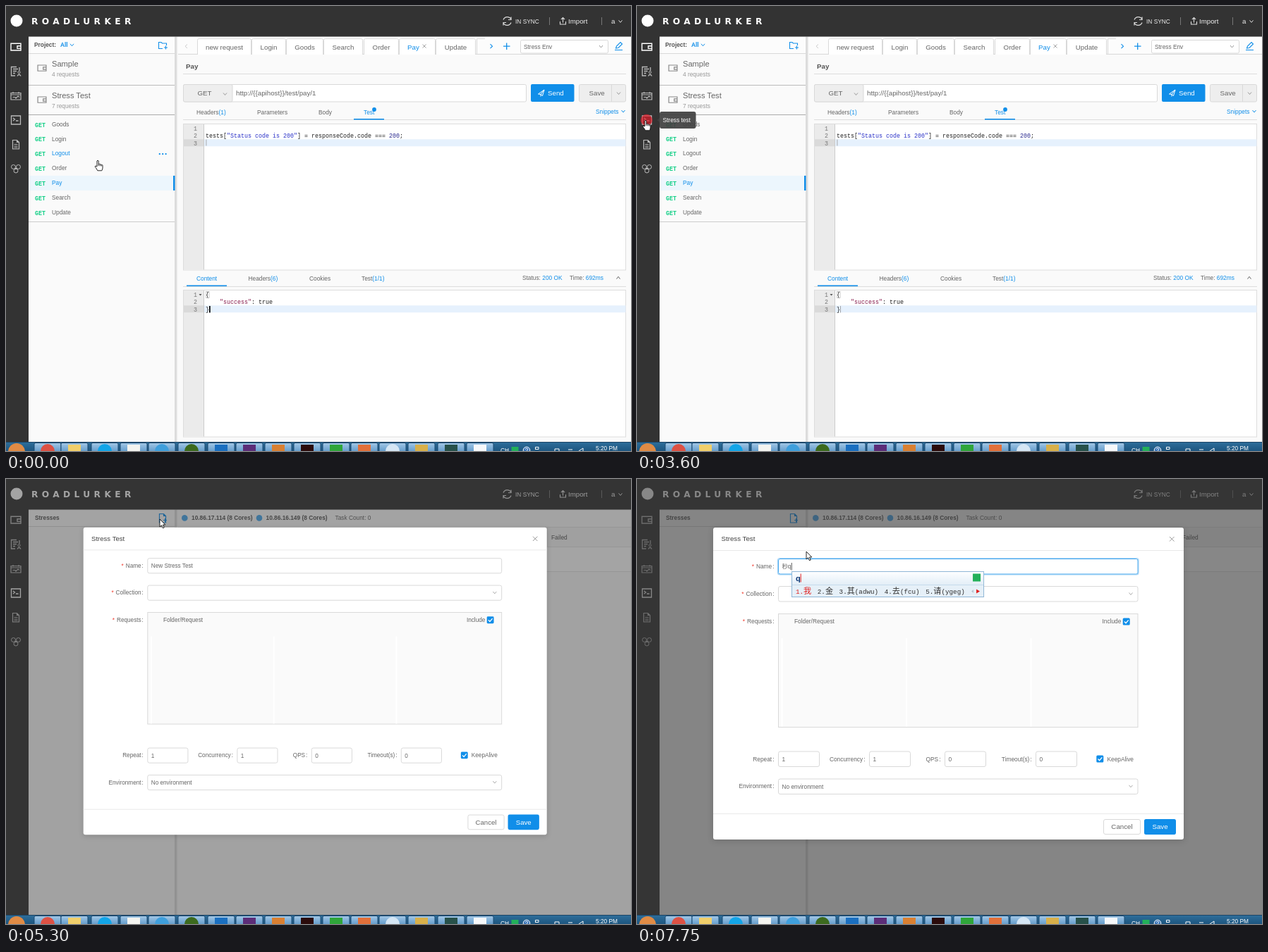
An HTML page for the animation above (8 s loop, 886 by 632 pixels).

```html
<!DOCTYPE html>
<html lang="en">
<head>
<meta charset="utf-8">
<title>Stress test walkthrough</title>
<style>
html, body { margin: 0; width: 100%; height: 100%; overflow: hidden; background: #fafafa; }
svg { display: block; width: 886px; height: 632px; }
text { white-space: pre; font-family: "Liberation Sans", Arial, "Noto Sans CJK SC", sans-serif; }
.mono { font-family: "Liberation Mono", "Noto Sans CJK SC", monospace; }
.brand { font-family: "DejaVu Sans", sans-serif; letter-spacing: 5.4px; }
</style>
</head>
<body>
<svg id="stage" viewBox="0 0 886 632"></svg>
<script>
const BLUE = '#108ee9', GREY = '#666', LINE = '#d9d9d9', LOOP = 8000;
const SMALL = 8.34, MEDIUM = 9.73, LARGE = 11.12;

// Drawing helpers, each returning SVG markup
const text = (x, y, s, fill = GREY, size = SMALL, extra = '') =>
  `<text x="${x}" y="${y}" fill="${fill}" font-size="${size}" ${extra}>${s}</text>`;
const span = (s, fill, extra = '') => `<tspan fill="${fill}" ${extra}>${s}</tspan>`;
const rect = (x, y, w, h, fill, stroke = 'none', rx = 0, extra = '') =>
  `<rect x="${x}" y="${y}" width="${w}" height="${h}" fill="${fill}" stroke="${stroke}" rx="${rx}" ${extra}/>`;
const circle = (x, y, r, fill, stroke = 'none') =>
  `<circle cx="${x}" cy="${y}" r="${r}" fill="${fill}" stroke="${stroke}"/>`;
const path = (d, stroke, width = 1, fill = 'none') =>
  `<path d="${d}" stroke="${stroke}" stroke-width="${width}" fill="${fill}"/>`;
const group = (id, body, extra = '') => `<g id="${id}" ${extra}>${body}</g>`;
const at = (x, y, body) => `<g transform="translate(${x} ${y})">${body}</g>`;
const hline = (x1, x2, y, color = LINE) => path(`M${x1} ${y}H${x2}`, color);
const chevron = (x, y, color, h = 1.5) => path(`M${x - 2.5} ${y - h}L${x} ${y + h}L${x + 2.5} ${y - h}`, color);
const BOLD = 'font-weight="700"', MONO = 'class="mono"', MID = 'text-anchor="middle"', END = 'text-anchor="end"';

const wallet = (color, s = 1) =>
  `<g transform="scale(${s})">${path('M-7-4.7H7V5H-7ZM7-1.3H2V2.4H7M-7-4.7H5', color, 1.4)}</g>`;
const docIcon = color =>
  path('M-4.5-6.5H1.5L4.5-3.5V6H-4.5ZM1.5-6.5V-3.5H4.5', color, 1.2);
const sheet = at(222, 56, docIcon(BLUE) + path('M1 2.5H6M3.5 0V5', BLUE, 1.1));

function header() {
  return rect(0, 0, 886, 43.5, '#333') + rect(0, 43, 32, 576, '#333') +
    circle(15, 21, 8.5, '#fff') +
    text(36, 26, 'ROADLURKER', '#fff', 12.2, BOLD + ' class="brand"') +
    path('M705 19.5A6 6 0 0 1 716 19M716 15.5V19.5H712M716 23.5A6 6 0 0 1 705 24M705 27.5V23.5H709', '#ddd', 1.2) +
    text(722, 24.6, 'IN SYNC', '#eee') +
    path('M770.5 16V27M844.5 16V27', '#777') +
    path('M785.5 22V26H793.5V22M789.5 23.5V16.5M787 19L789.5 16.5L792 19', '#ddd', 1.1) +
    text(797, 25, 'Import', '#eee', MEDIUM) +
    text(858, 25, 'a', '#eee', MEDIUM) + chevron(871, 21.8, '#ddd');
}

function sidebar() {
  const c = '#bbb';
  return at(14, 58, wallet('currentColor')).replace('<g', '<g id="navApi"') +
    at(14, 93, path('M1-6.5H-6.5V6H-1M-4-3.5H3M-4-.5H1M-4 2.5H-1M5-6V-1M2 6.5Q4.5 2 7 6.5', c, 1.3) + circle(4.5, 1.2, 1.6, 'none', c)) +
    at(14, 128, path('M-7-4.5H7V5H-7ZM-7-2H7M-4-6V-3.5M4-6V-3.5M-4.5 1.5H-1L0 3L3 0L5 1.5', c, 1.2)) +
    at(14, 162, path('M-6.5-6H6.5V6H-6.5ZM-4-3L-1.5-1L-4 1M0 1H3.5', 'currentColor', 1.3)).replace('<g', '<g id="navStress"') +
    at(14, 197, docIcon(c) + path('M-2.5-.5H2.5M-2.5 2H2.5M-2.5 4H2.5', c, .9)) +
    at(14, 231, [[-3.5, -2.5], [3.5, -2.5], [0, 3]].map(p => circle(...p, 3, 'none', c)).join('') + circle(0, 0, 1.2, c));
}

const ROWS = ['Goods', 'Login', 'Logout', 'Order', 'Pay', 'Search', 'Update'];
const rowY = i => 168 + i * 20.83;

function panel() {
  return rect(32, 43.5, 208, 575.5, '#fafafa') + rect(32, 43.5, 854, 24, '#fcfcfc') +
    rect(239, 43.5, 3.5, 575.5, '#dcdcdc') + rect(242, 43.5, 1.5, 575.5, '#f1f1f1') + hline(32, 239, 67.5);
}

function requestList() {
  const folder = (y, name, count) => at(51, y + 6, wallet('#888', .85)) +
    text(65, y + 3.5, name, GREY, LARGE) + text(65, y + 18, count + ' requests', '#999');
  const rows = ROWS.map((name, i) =>
    text(41, rowY(i) + 3.6, 'GET', '#14cf87', SMALL, BOLD + ' ' + MONO) +
    text(65, rowY(i) + 2.8, name, GREY, SMALL, 'data-row')).join('');
  return text(40, 58.3, 'Project:', '#555', SMALL, BOLD) + text(77, 58.3, 'All', BLUE, SMALL, BOLD) +
    chevron(93.5, 55.3, BLUE) +
    path('M222 60.5H216.5V51.5H220L221.5 53H227.5V56M224 59H229M226.5 56.5V61.5', BLUE, 1.1) +
    folder(82, 'Sample', 4) + hline(32, 239, 112.5, '#bbb') +
    folder(127, 'Stress Test', 7) + hline(32, 239, 154.5, '#aaa') +
    rect(32, 241, 205, 21, '#ecf6fd') + rect(237, 241, 2.5, 21, BLUE) +
    rows + hline(32, 239, 306.5, '#ccc') +
    group('dots', [217.8, 222.2, 226.6].map(x => circle(x, 0, 1.15, 'currentColor')).join(''));
}

function editor(y, h, active, lines) {
  const top = y + 1.5 + active * 10.4;
  const nums = lines.map((s, i) => text(271, y + 10 + i * 10.3, i + 1, '#777', SMALL, END + ' ' + MONO));
  const code = lines.map((s, i) => text(283, y + 10 + i * 10.3, s, '#222', SMALL, MONO));
  return rect(251.5, y + .5, 627, h, '#fff', '#ddd') + rect(252, y + 1, 29, h - 1, '#ebebeb') +
    rect(281, top, 597.5, 10, '#e6f1fd') + rect(252, top, 29, 10, '#dadada') +
    path(`M280.5 ${y + 1}V${y + h}`, '#ccc') + nums.join('') + code.join('');
}

function requestPage() {
  const tabs = [[272, 75, 'new request'], [349, 47, 'Login'], [398, 51, 'Goods'], [451, 54, 'Search'],
    [508, 48, 'Order'], [558, 50, ''], [610, 55, 'Update']].map(([x, w, s]) =>
      path(`M${x - .5} 69V48.5Q${x - .5} 46.5 ${x + 1.5} 46.5H${x + w - 1.5}Q${x + w + .5} 46.5 ${x + w + .5} 48.5V69`, LINE, 1, '#fff') +
      text(x + w / 2, 61.5, s, GREY, MEDIUM, MID)).join('');
  const count = (name, n) => name + span(`(${n})`, BLUE);
  const str = s => span(s, '#2a32c8');
  return requestList() + hline(244, 886, 68.5) + tabs +
    path('M667.5 69V46.5H679', LINE) +
    path('M257 54.5L254 57.2L257 60', '#ccc') + path('M686.5 54.2L689.5 57.2L686.5 60.2', BLUE, 1.1) +
    path('M705 57.2H714.5M709.7 52.5V62', BLUE, 1.3) +
    text(569, 61.5, 'Pay', BLUE, MEDIUM) + path('M590.5 54.5L595.5 59.5M595.5 54.5L590.5 59.5', '#999', .9) +
    rect(729.5, 48.5, 124, 18.5, '#fff', LINE, 2) + text(734, 60.5, 'Stress Env') + chevron(843.5, 57.5, '#999') +
    path('M864.5 60L865.5 57L871 51.5L873.5 54L868 59.5ZM863 62.5H874', BLUE, 1.1) +
    text(255, 89, 'Pay', '#555', MEDIUM, BOLD) + hline(251, 879, 96.5, '#ddd') +
    rect(251.5, 111.5, 486, 24.5, '#fff', LINE, 2) + rect(251.5, 111.5, 69.5, 24.5, '#eee', LINE, 2) +
    text(271.5, 127.3, 'GET', GREY, MEDIUM) + chevron(310.5, 125, '#999') +
    text(326, 127, 'http://{{apihost}}/test/pay/1', GREY, MEDIUM) +
    rect(744, 111, 61.5, 25, BLUE, 'none', 2) + path('M754.5 125L763 119L760.5 127.5L758 125.5L763 119M758 125.5V128.5M754.5 125L758 125.5', '#fff') +
    text(768, 127, 'Send', '#fff', MEDIUM) +
    rect(812.5, 111.5, 66, 24.5, '#eee', LINE, 2) + path('M858.5 112V136', LINE) +
    text(826.5, 127, 'Save', GREY, MEDIUM) + chevron(868.5, 124, '#999') +
    text(270, 153.5, count('Headers', 1)) + text(356, 153.5, 'Parameters') + text(443, 153.5, 'Body') +
    text(507, 153.5, 'Test', BLUE) + circle(522, 147, 2.9, BLUE) +
    text(836, 152.6, 'Snippets', BLUE) + chevron(875, 149.5, BLUE) +
    hline(251, 879, 161.5, '#ddd') + rect(493, 160, 43, 1.6, BLUE) +
    editor(167, 207.5, 2, ['', `tests[${str('"Status code is 200"')}] = responseCode.code === ${span('200', '#2a2a90')};`, '']) +
    rect(283.5, 189.5, .8, 9, '#999') +
    text(270, 389.7, 'Content', BLUE) + text(343.5, 389.7, count('Headers', 6)) + text(430, 389.7, 'Cookies') +
    text(504, 389.7, count('Test', '1/1')) + text(732, 389.2, 'Status: ' + span('200 OK', BLUE)) +
    text(799, 389.2, 'Time: ' + span('692ms', BLUE)) + chevron(868, 386, GREY, -1.7) +
    hline(251, 879, 398.5, '#ddd') + rect(256, 396.5, 57, 1.6, BLUE) +
    editor(403, 208.5, 2, ['{', `    ${span('"success"', '#8a1f4f')}: true`, '}']) +
    path('M273.5 409H277.5L275.5 411.5Z', 'none', 0, '#555') +
    rect(283.5, 405.5, 4.5, 9, 'none', '#bbb', 0, 'stroke-width=".7"') +
    rect(288, 426, 1.7, 9.5, '#000', 'none', 0, 'id="caret"');
}

function stressPage() {
  const heads = [[285, 'Run Date'], [445, 'Request Count'], [676, 'TPS'], [773, 'Failed']];
  return text(41, 58.3, 'Stresses', '#555', SMALL, BOLD) +
    rect(209.5, 45.5, 26, 22, '#fff', '#8fc6f2', 2, 'id="ring" opacity=".6"') + sheet +
    circle(253.3, 55.4, 4.3, '#49a9ee') + text(263, 58.3, '10.86.17.114 (8 Cores)', '#555', SMALL, BOLD) +
    circle(359, 55.4, 4.3, '#49a9ee') + text(368.5, 58.3, '10.86.16.149 (8 Cores)', '#555', SMALL, BOLD) +
    text(466.5, 58.3, 'Task Count: 0') +
    rect(244.5, 68.5, 642, 63, '#fff', '#e4e4e4') + rect(245, 69, 641, 27, '#f7f7f7') + hline(245, 886, 96.5, '#e4e4e4') +
    path('M278.5 69V96M438.5 69V96M670.5 69V96M767.5 69V96', '#e4e4e4') +
    heads.map(([x, s]) => text(x, 85.5, s, '#555')).join('') +
    circle(546.5, 113.4, 3.8, 'none', '#aaa') + path('M545 112.3V113M548 112.3V113M544.8 115.4Q546.5 113.8 548.2 115.4', '#aaa', .8) +
    text(553.5, 116.5, '暂无数据', '#999');
}

function modal() {
  const label = (x, y, s, star) => text(x, y, (star ? span('*', '#f04134') : '') +
    `<tspan dx="${star ? 3 : 0}">${s}</tspan><tspan dx="1">:</tspan>`, GREY, SMALL, END);
  const box = (x, y, w, s = '') => rect(x + .5, y + .5, w, 21.5, '#fff', LINE, 2.5) + text(x + 5.5, y + 14.2, s);
  const check = (x, y) => rect(x, y, 10, 10, BLUE, 'none', 1.5) + path(`M${x + 2.2} ${y + 5}L${x + 4.3} ${y + 7.2}L${x + 8} ${y + 2.8}`, '#fff', 1.3);
  return rect(108, 69, 667, 443, '#fff', 'none', 3, 'style="filter:drop-shadow(0 2px 4px rgba(0,0,0,.16))"') +
    text(119.5, 88.3, 'Stress Test', '#444', MEDIUM) + path('M755 82L761.5 88.5M761.5 82L755 88.5', '#999') +
    hline(108, 775, 101.5, '#e9e9e9') +
    label(194.5, 127, 'Name', true) +
    rect(199.5, 112.5, 511.5, 23.5, 'none', '#a5d3f6', 3, 'id="glow" stroke-width="1.2"') +
    rect(200.5, 113.5, 509.5, 21.5, '#fff', LINE, 2.5, 'id="field"') +
    rect(205, 118, 62, 11.5, '#3390ff', 'none', 0, 'id="mark"') +
    text(205.5, 127, '', GREY, SMALL, 'id="name"') + rect(0, 119, .8, 10.5, '#333', 'none', 0, 'id="bar"') +
    label(194.5, 166, 'Collection', true) + box(200, 152, 509.5) + chevron(700, 163, '#aaa') +
    label(194.5, 205, 'Requests', true) + rect(200.5, 191.5, 509.5, 161, '#fafafa', LINE) +
    path('M205.5 226V352M382 226V352M558.5 226V352', '#fff', 2) +
    text(223, 205.4, 'Folder/Request') + text(659.5, 205.4, 'Include') + check(688.7, 197.5) +
    label(194.5, 400.5, 'Repeat') + box(200, 386.5, 58, '1') +
    label(323.5, 400.5, 'Concurrency') + box(329, 386.5, 58, '1') +
    label(430.5, 400.5, 'QPS') + box(436, 386.5, 58, '0') +
    label(559.7, 400.5, 'Timeout(s)') + box(565, 386.5, 58, '0') +
    check(651.3, 392.5) + text(666.5, 400.5, 'KeepAlive') +
    label(194.5, 439.3, 'Environment') + box(200, 425.5, 509.5, 'No environment') + chevron(700, 436.3, '#aaa') +
    hline(108, 775, 475.5, '#e9e9e9') +
    rect(661.5, 483.5, 52, 21, '#fff', LINE, 2.5) + text(687.5, 497.4, 'Cancel', GREY, MEDIUM, MID) +
    rect(719, 483, 45, 22, BLUE, 'none', 2.5) + text(741.5, 497.4, 'Save', '#fff', MEDIUM, MID);
}

function taskbar() {
  const icons = [[59, '#dd5144', 1], [97, '#f1cf6b'], [140, '#12a5e8', 1], [181, '#f4f4f0'], [221, '#3f9fdc', 1],
    [263, '#3c6a1e', 1], [305, '#1a6fc0'], [345, '#5c2d78'], [386, '#d98032'], [427, '#2b0b0b'], [468, '#2fa53a'],
    [508, '#e2703a'], [548, '#d5e6f4', 1], [589, '#d8b04a'], [631, '#27514a'], [672, '#f6f8fa']];
  const shapes = icons.map(([x, c, round]) => rect(x - 19, 620.5, 38, 14, 'url(#button)', '#1d4a70', 2) +
    (round ? circle(x, 632, 10, c) : rect(x - 9, 623, 18, 12, c))).join('');
  return rect(0, 619, 886, 13, 'url(#bar0)') + hline(0, 886, 619.5, '#1c4566') +
    circle(15, 633, 12, '#e08b45') + shapes +
    text(701, 633.5, 'CH', '#fff') + rect(716.5, 626, 10, 6, '#23b05a') +
    circle(738, 631, 4.8, '#3d77b8', '#fff') + text(738, 634, '?', '#fff', SMALL, MID) +
    path('M750.5 630V626.5H755V629.5H750.5', '#fff') +
    path('M778 632V629H784V632M797 630H803M812 632L818 628V632', '#fff') +
    text(836, 630.5, '5:20 PM', '#fff');
}

const HALF = 5.55, GAP = 8.6;
const isWide = ch => ch > '\u2e80';
const units = s => [...s].reduce((n, ch) => n + (isWide(ch) ? 2 : 1), 0);

function ime(x, typed, words) {
  const items = words.split(' ');
  const w = items.reduce((n, s) => n + units(s) * HALF, 0) + 4 * GAP + 33.3;
  let pen = x + 6;
  const list = items.map((s, i) => {
    const body = [...s].map(ch => isWide(ch) ? `<tspan font-size="11.1">${ch}</tspan>` : ch).join('');
    const out = text(pen, 163, body, i ? '#333' : '#e02020', 9.25, MONO);
    pen += units(s) * HALF + GAP;
    return out;
  }).join('');
  return rect(x + .5, 131.5, w - 1, 36, '#e6f0f8', '#8fb6d6') + rect(x + 1, 132, w - 2, 18, 'url(#imeTop)') +
    hline(x + 1, x + w - 1, 150.5, '#c5dbec') +
    text(x + 6, 144.5, typed, '#143c78', LARGE, BOLD) + rect(x + 6.5 + typed.length * 6.2, 134.5, 1, 12, '#e02020') +
    rect(x + w - 16, 134.5, 11, 11, '#23b05a') + list +
    path(`M${x + w - 15} 157V162L${x + w - 18} 159.5Z`, 'none', 0, '#b9c6d2') +
    path(`M${x + w - 11} 156.5V162.5L${x + w - 6} 159.5Z`, 'none', 0, '#e02020');
}

const grad = (id, a, b) => `<linearGradient id="${id}" x2="0" y2="1"><stop stop-color="${a}"/><stop offset="1" stop-color="${b}"/></linearGradient>`;
const SHAPES = {
  hand: path('M-1 1Q0-.6 1.2 1V5.5Q2.4 4.6 3.3 6Q4.5 5.2 5.3 6.6Q6.6 6 7 7.6V11Q6.8 13 5.8 14.8H-.2Q-1.5 12-3.8 9.2Q-4 7.2-1 9ZM1.2 5.5V8M3.3 6V8.3M5.3 6.6V8.5', '#111', .9, '#fff'),
  arrow: path('M0 0V11L2.6 8.7L4.4 12.8L6.2 12L4.5 8H7.8Z', '#111', .9, '#fff'),
  beam: path('M-2.5-5.5H-.5L0-5L.5-5.5H2.5M0-5V5M-2.5 5.5H-.5L0 5L.5 5.5H2.5', '#222', 1)
};

const stage = document.getElementById('stage');
stage.innerHTML = `<defs>${grad('button', '#a3c8e6', '#5b96c8')}${grad('bar0', '#2f6f9c', '#1d5680')}${grad('imeTop', '#fdfeff', '#e3eef7')}</defs>` +
  rect(0, 0, 886, 632, '#fafafa') + panel() + group('api', requestPage()) + group('stress', stressPage()) +
  header() + sidebar() +
  group('tip', path('M28.5 162L32 159V165Z', 'none', 0, '#404040') + rect(32, 150, 51.5, 24, '#404040', 'none', 3) + text(36.5, 165, 'Stress test', '#fff')) +
  rect(0, 0, 886, 619, '#373737', 'none', 0, 'id="mask"') + group('modal', modal()) + taskbar() + group('ime', '') +
  group('press', circle(0, 0, 8.3, '#ee1c2a'), 'opacity=".65"') +
  group('cursor', Object.entries(SHAPES).map(([k, s]) => group(k, s)).join(''));

const el = id => document.getElementById(id);
const set = (id, attrs) => { for (const k in attrs) el(id).setAttribute(k, attrs[k]); };
const show = (id, on) => set(id, { visibility: on ? 'inherit' : 'hidden' });
const pick = (table, t) => table.filter(row => row[0] <= t).pop().slice(1);
const within = (t, a, b) => t >= a && t < b;

// time, shape, x, y, row with dots, highlighted row
const MOVES = [
  [0, 'hand', 130, 219, 2, 2], [1410, 'hand', 133, 220, 3, 2], [1560, 'hand', 120, 236, 3, 3],
  [1670, 'hand', 104, 254, 4, 3], [1810, 'hand', 100, 251, 4], [1950, 'hand', 82, 243, 4],
  [2080, 'hand', 66, 229, 3, 3], [2200, 'hand', 50, 211, 2, 2], [2330, 'hand', 36, 195, 1, 1],
  [2460, 'arrow', 24, 181], [2580, 'hand', 15, 169], [2710, 'hand', 11, 161], [2970, 'hand', 12, 162],
  [3870, 'hand', 18, 154], [4000, 'arrow', 38, 92], [4140, 'arrow', 52, 64], [4290, 'arrow', 108, 57],
  [4390, 'arrow', 163, 53], [4530, 'arrow', 190, 52], [4650, 'arrow', 210, 56], [4760, 'arrow', 218, 57],
  [5690, 'arrow', 262, 146], [5810, 'arrow', 281, 138], [5950, 'beam', 285, 124], [6210, 'beam', 176, 118],
  [6330, 'beam', 73, 112], [6470, 'arrow', 240, 103]
];
const TIP = [[0, 0], [2830, .5], [2970, .92], [4000, .4], [4140, 0]];
// time, scale, opacity, mask
const ZOOM = [[0, 0, 0, 0], [5160, .849, .82, .216], [5300, .985, 1, .45], [5450, 1, 1, .57], [5550, 1, 1, .6]];
// time, field text, caret x, popup x, typed keys, candidates
const TYPING = [[0, 'New Stress Test'], [7110, 't', 208, 207, 't', '1.和 2.竹 3.行(f) 4.生(g) 5.等(ff)'],
  [7360, 'ti', 210, 207, 'ti', '1.秒 2.稍(ieg) 3.称(qiy) 4.秘(ntt) 5.秒(tt)'], [7640, '秒', 214.5],
  [7750, '秒q', 218.8, 219, 'q', '1.我 2.金 3.其(adwu) 4.去(fcu) 5.请(ygeg)']];
const rowLabels = [...document.querySelectorAll('[data-row]')];

function draw(t) {
  const [shape, x, y, dots, blue] = pick(MOVES, t);
  set('cursor', { transform: `translate(${x} ${y})` });
  Object.keys(SHAPES).forEach(k => show(k, k === shape));

  const onStress = t >= 3750;
  show('api', !onStress);
  show('stress', onStress);
  set('navApi', { color: onStress ? '#bbb' : '#fff' });
  set('navStress', { color: onStress ? '#fff' : '#bbb' });
  rowLabels.forEach((row, i) => row.setAttribute('fill', i === blue || i === 4 ? BLUE : GREY));
  show('dots', dots !== undefined && !onStress);
  set('dots', { transform: `translate(0 ${rowY(dots || 0) + .5})`, color: dots === blue ? BLUE : '#444' });
  set('caret', t < 3600 ? { width: 1.7, fill: '#000' } : { width: .7, fill: '#888' });
  set('tip', { opacity: pick(TIP, t)[0] });

  const [scale, opacity, mask] = pick(ZOOM, t);
  set('modal', { transform: `translate(220.6 55.7) scale(${scale}) translate(-220.6 -55.7)`, opacity });
  set('mask', { opacity: mask });
  show('ring', within(t, 5160, 5300));

  const pressed = within(t, 3600, 3870) || within(t, 4930, 5060) || within(t, 6090, 6470);
  show('press', pressed);
  set('press', { transform: `translate(${x + (shape === 'hand' ? 1.5 : 0)} ${y})` });

  const selected = within(t, 6210, 7110);
  set('field', { stroke: t >= 5810 ? '#49a9ee' : LINE });
  show('glow', t >= 6210);
  show('mark', selected);

  const [name, caretX, left, typed, words] = pick(TYPING, t);
  el('name').textContent = name;
  set('name', { fill: selected ? '#fff' : GREY });
  show('bar', caretX !== undefined);
  set('bar', { x: caretX || 0 });
  const popup = words ? ime(left, typed, words) : '';
  if (draw.popup !== popup) el('ime').innerHTML = draw.popup = popup;
}

const start = performance.now();
function tick() {
  draw((performance.now() - start) % LOOP);
  requestAnimationFrame(tick);
}
tick();
</script>
</body>
</html>
```
